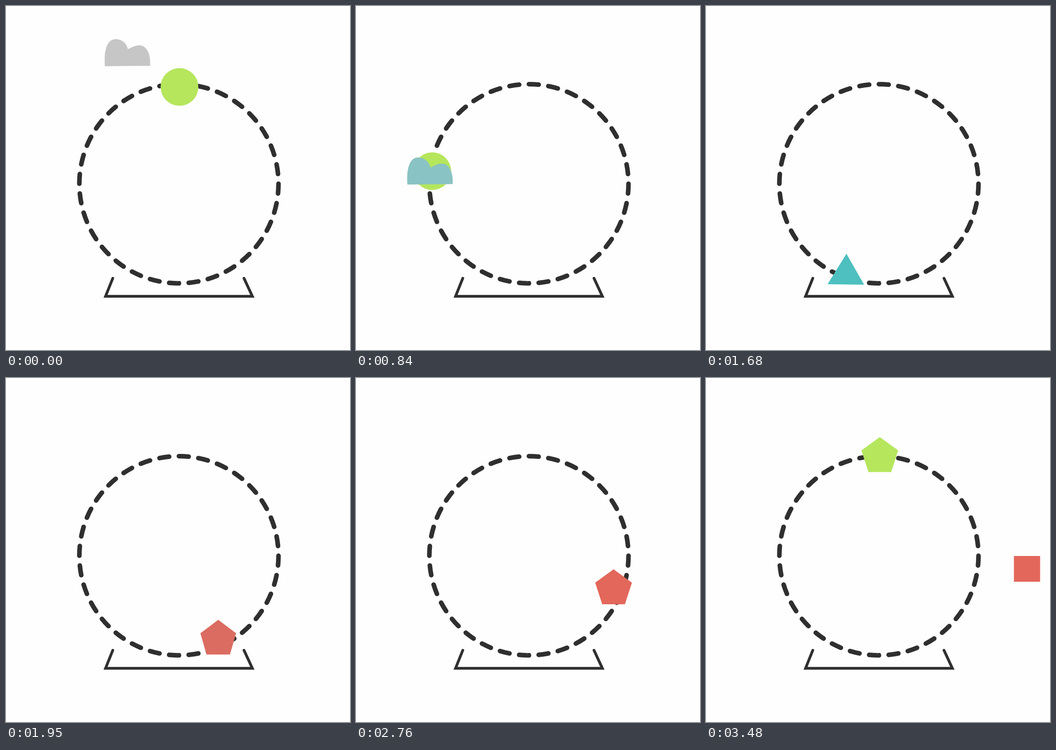
Recreate the animation shown at these times as an HTML page. Size 748 by 748 pixels, loop 3.51 s.

```html
<!DOCTYPE html>
<html lang="en">
<head>
<meta charset="utf-8">
<style>
  html, body { margin: 0; height: 100%; overflow: hidden; background: #fefefe; }
  svg { display: block; width: 100vw; height: 100vh; }
</style>
</head>
<body>
<svg viewBox="0 0 748 748">
  <g fill="none" stroke="#2f2f2f" stroke-linecap="round">
    <circle cx="376" cy="386.5" r="216.5" stroke-width="10" pathLength="64" stroke-dasharray="1"/>
    <path d="M232.2 592L216.5 631.2H535.7L517.5 592" stroke-width="6"/>
  </g>
  <circle id="ball" fill="#b5e65c"/>
  <path id="body"/>
  <rect id="square" width="57" height="56" fill="#e3675b"/>
</svg>
<script>
const LOOP = 3510, STEP = 30, RADIUS = 211, RAD = Math.PI / 180;
const LANDING = 840, EJECTION = 2970;
const GREY = [198, 198, 198], TEAL = [77, 192, 191], RED = [227, 103, 91], GREEN = [181, 230, 92];
const [ball, body, square] = ['ball', 'body', 'square'].map(id => document.getElementById(id));

// The ride has three legs, each easing from one resting angle (degrees from the top) to the next.
const LEGS = [
  { start: 0, end: 1080, from: -.6, to: 108, power: 1.79, lag: 2.9 },
  { start: 1080, end: 2160, from: 108, to: 221.4, power: 1.67, lag: 1.48 },
  { start: 2160, end: 3480, from: 221.4, to: 356.1, power: 1.4, lag: 3.06 },
];

// Outlines share one structure, four cubic segments, so that they can morph.
const CLOUD = [[-49, 29.5], [-52, -9.5], [-42, -29.5], [-26, -29.5], [-12, -29.5], [-2, -20.5], [1, -7.5],
  [12, -13.5], [19, -16], [27, -16], [40, -15.5], [51, -.5], [49.5, 28.5]];
const TRIANGLE = polygon([[-40, 33], [-19.5, -.25], [1, -33.5], [20.2, .25], [39.5, 34]]);
const PENTAGON = polygon([0, 1, 2, 3, 4].map(i => {
  const a = (216 + 72 * i) * RAD;
  return [42 * Math.sin(a), -42 * Math.cos(a)];
}));

function mix(a, b, k) {
  return Array.isArray(a) ? a.map((v, i) => mix(v, b[i], k)) : a + (b - a) * k;
}
function polygon(corners) {
  const points = [corners[0]];
  for (let i = 1; i < corners.length; i++)
    for (const k of [1 / 3, 2 / 3, 1]) points.push(mix(corners[i - 1], corners[i], k));
  return points;
}
function ramp(t, from, to) {
  const k = Math.min(1, Math.max(0, (t - from) / (to - from)));
  return k * k * (3 - 2 * k);
}

function angleAt(t) {
  const leg = LEGS.find(({ end }) => t <= end);
  const k = (t - leg.start) / (leg.end - leg.start);
  const done = k ** leg.power, left = leg.lag * (1 - k) ** leg.power;
  return mix(leg.from, leg.to, done / (done + left));
}
function orbit([cx, cy], t) {
  const a = angleAt(t) * RAD;
  return [cx - RADIUS * Math.sin(a), cy - RADIUS * Math.cos(a)];
}

// The cloud hops up, then drops onto the ball.
function hop(t) {
  const u = t / 225 - 1;
  return [264 + .2324 * t - 4.227e-4 * t * t, 48.5 + u * u * (57.1 + 1.5 * u - 2.64 * u * u)];
}
function throwSquare(t) {
  const p = (t - EJECTION) / 510;
  return [574 + 208 * p - 84 * p * p, 361 - 125 * p + 179 * p * p];
}

function setAttributes(element, values) {
  for (const name in values) element.setAttribute(name, values[name]);
}

function render(t) {
  const toTriangle = ramp(t, 860, 1030), toPentagon = ramp(t, 1770, 1980);

  const [cx, cy] = orbit([375, 387], t);
  setAttributes(ball, { cx, cy, r: 41 * (1 - ramp(t, 860, 960)) });

  const center = mix(mix([370, 386.5], [362, 369], toTriangle), [363.6, 381], toPentagon);
  const outline = mix(mix(CLOUD, TRIANGLE, toTriangle), PENTAGON, toPentagon);
  const color = mix(mix(mix(GREY, TEAL, ramp(t, 780, 900)), RED, toPentagon), GREEN, ramp(t, 2940, 3060));
  setAttributes(body, {
    d: `M${outline[0]}C${outline.slice(1).join(' ')}Z`,
    transform: `translate(${t < LANDING ? hop(t) : orbit(center, t)})`,
    fill: `rgb(${color.map(Math.round)})`,
  });

  const [x, y] = throwSquare(t);
  setAttributes(square, { x: x - 28.5, y: y - 28, visibility: t < EJECTION ? 'hidden' : 'visible' });
}

const start = performance.now();
function tick() {
  const t = (performance.now() - start) % LOOP;
  render(Math.floor(t / STEP) * STEP);
  requestAnimationFrame(tick);
}
tick();
</script>
</body>
</html>
```
